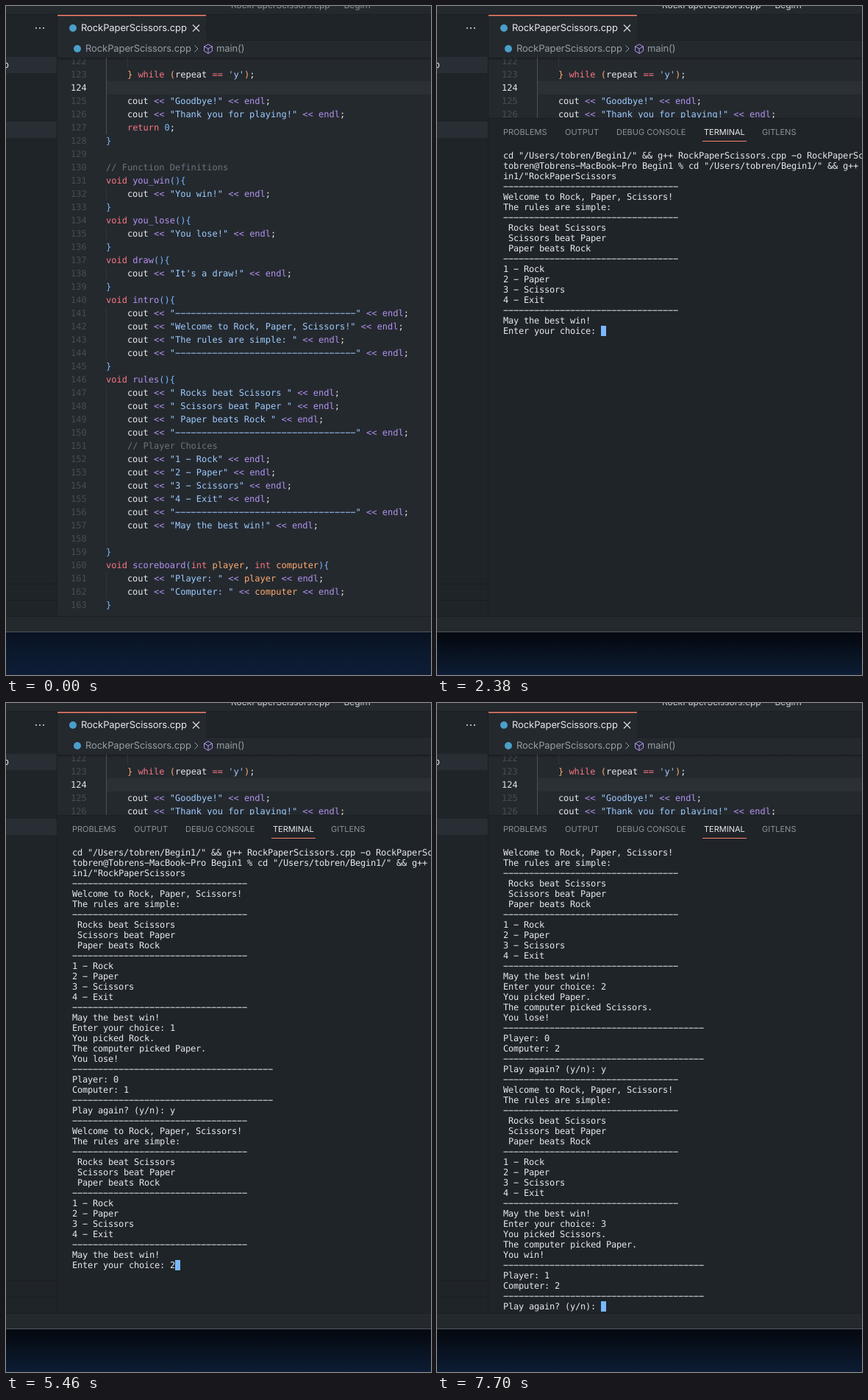
Write an HTML page that moves like this. It is 578 px wide and 908 px high and loops after 8 s.

```html
<!DOCTYPE html>
<html lang="en">
<head>
<meta charset="utf-8">
<title>Rock Paper Scissors</title>
<style>
html, body { margin: 0; width: 100%; height: 100%; overflow: hidden; background: #24292e; }
body { position: relative; text-rendering: geometricPrecision; font-family: Inter, sans-serif; }
div, pre, svg, .label { position: absolute; margin: 0; }
pre { font: 12px/18px "DejaVu Sans Mono", monospace; color: #e6eaee; }
.label { line-height: 20px; white-space: pre; }
#desk { left: 0; top: 850px; width: 100%; height: 58px; background: linear-gradient(#091120, #0b192d 45%, #0d1d35); }
#shade { inset: 0; background: linear-gradient(#04070cd0, #04070c60 50%, #04070c00); }
#editor { left: 70px; top: 70px; width: 508px; height: 759px; overflow: hidden; }
#panel { left: 70px; top: 152px; width: 508px; height: 677px; overflow: hidden; background: #1f2428; }
#term { left: 20px; top: 44px; line-height: 14px; letter-spacing: -.224px; }
#block { width: 7px; height: 14px; box-sizing: border-box; border: 1px solid #79b8ff; }
.guide { width: 1px; background: #30363d; }
svg { inset: 0; fill: none; }
</style>
</head>
<body>
<div id="desk"><div id="shade"></div></div>
<div id="editor">
  <div style="left:66px;top:32px;width:442px;height:18px;background:#2b3036"></div>
  <pre id="nums" style="left:18px;top:-4px;color:#444d56"></pre>
  <pre id="code" style="left:66px;top:-4px"></pre>
  <div id="caret" style="left:94px;top:32px;width:2px;height:18px;background:#c8e1ff"></div>
  <div style="left:0;top:0;width:508px;height:4px;background:linear-gradient(#16191ccc,#16191c00)"></div>
</div>
<div id="panel">
  <pre id="term"></pre>
  <div id="block"></div>
</div>
<svg id="art" width="578" height="850"></svg>
<script>
const $ = id => document.getElementById(id);
const rule = '-'.repeat(34), wide = '-'.repeat(39);
const dashes = s => s.replace(/-/g, '\u2212');   // long hyphens

// window frame
const box = (x, y, w, h, c) => `<rect x="${x}" y="${y}" width="${w}" height="${h}" fill="${c}"/>`;
$('art').innerHTML =
  box(0, 12, 69, 817, '#1f2428') + box(69, 12, 1, 817, '#1b1f23') +
  box(272, 12, 306, 35, '#1f2428') + box(272, 46, 306, 1, '#1b1f23') +
  box(0, 11, 578, 1, '#1b1f23') + box(70, 12, 202, 1.5, '#f9826c') +
  box(0, 69, 69, 22, '#282e34') + box(0, 157, 69, 22, '#282e34') +
  box(0, 784, 69, 1, '#1a1e22') + box(0, 806, 69, 1, '#1a1e22') +
  box(0, 828, 578, 1, '#1b1f23') + box(0, 849, 578, 1, '#50565c') +
  [41, 46, 51].map(x => `<circle cx="${x}" cy="30" r="1.1" fill="#d1d5da"/>`).join('') +
  '<circle cx="91" cy="30" r="5" fill="#4a9fca"/><circle cx="97" cy="58" r="5" fill="#4a9fca"/>' +
  '<path d="M254 25.5l9 9m0-9l-9 9" stroke="#e1e4e8" stroke-width="1.2"/>' +
  '<path d="M256.500 53.500l4.500 4.500-4.500 4.500" stroke="#959da5"/>' +
  '<path d="M275 52l5.500 3v6l-5.500 3.500-5.500-3.500v-6zM269.500 55l5.500 3 5.500-3M275 58v6" stroke="#b392f0"/>';

function label(x, y, text, size, color, parent = document.body) {
  const el = document.createElement('span');
  el.className = 'label';
  el.textContent = text;
  el.style.cssText = `left:${x}px;top:${y - 10}px;font-size:${size}px;color:${color}`;
  if (size == 13) el.style.letterSpacing = '-.1px';
  return parent.appendChild(el);
}
const title = label(306, -1.5, 'RockPaperScissors.cpp \u2014 Begin1', 12, '#d1d5da');
label(102, 30, 'RockPaperScissors.cpp', 13, '#e6eaee');
label(108, 58, 'RockPaperScissors.cpp', 13, '#959da5');
label(286, 58, 'main()', 13, '#959da5');
label(-4, 80, 'p', 13, '#e1e4e8');
[[20, 'PROBLEMS'], [104, 'OUTPUT'], [174, 'DEBUG CONSOLE'], [293, 'TERMINAL'], [372, 'GITLENS']].forEach(([x, name]) =>
  label(x, 19, name, 11, name == 'TERMINAL' ? '#e6eaee' : '#8b939b', $('panel')));
$('panel').insertAdjacentHTML('beforeend',
  '<div style="left:291px;top:31px;width:60px;height:1px;background:#f9826c"></div>' +
  '<div style="left:0;top:0;width:508px;height:1px;background:#1b1f23"></div>');

// source code
const out = s => `    cout << "${s}" << endl;`;
const fn = (head, ...body) => [`void ${head}{`, ...body, '}'];
const code = [
  '', "    } while (repeat == 'y');", '',
  out('Goodbye!'), out('Thank you for playing!'), '    return 0;', '}', '',
  '// Function Definitions',
  ...fn('you_win()', out('You win!')),
  ...fn('you_lose()', out('You lose!')),
  ...fn('draw()', out("It's a draw!")),
  ...fn('intro()', out(rule), out('Welcome to Rock, Paper, Scissors!'), out('The rules are simple: '), out(rule)),
  ...fn('rules()', out(' Rocks beat Scissors '), out(' Scissors beat Paper '), out(' Paper beats Rock '), out(rule),
    '    // Player Choices', out('1 - Rock'), out('2 - Paper'), out('3 - Scissors'), out('4 - Exit'),
    out(rule), out('May the best win!'), ''),
  ...fn('scoreboard(int player, int computer)',
    '    cout << "Player: " << player << endl;', '    cout << "Computer: " << computer << endl;')
];
const tokens = [
  [/\/\/.*/, '#6a737d'], [/"[^"]*"|'y'/, '#9ecbff'], [/\b(?:void|int|while|return)\b|==/, '#f97583'],
  [/<<|endl|\w+(?=\()/, '#b392f0'], [/\b(?:player|computer)\b/, '#ffab70'], [/[{}()]|\b0\b/, '#79b8ff']
];
const lexer = new RegExp(tokens.map(t => `(${t[0].source})`).join('|'), 'g');
const paint = (line, i) => dashes(line.replace(lexer, (m, ...groups) => {
  const k = groups.slice(0, tokens.length).findIndex(g => g !== undefined);
  const color = i == 1 && k == 5 ? '#ffab70' : tokens[k][1];
  return `<span style="color:${color}">${m.replace(/</g, '&lt;')}</span>`;
}));
$('code').innerHTML = code.map(paint).join('\n');
$('nums').innerHTML = code.map((_, i) => i == 2 ? '<span style="color:#e1e4e8">124</span>' : 122 + i).join('\n');

const guide = (x, row, rows, color = '') => $('editor').insertAdjacentHTML('beforeend',
  `<div class="guide" style="left:${x}px;top:${row * 18 - 4}px;height:${rows * 18}px;background:${color}"></div>`);
guide(66, 0, 6, '#4a525a');
guide(95, 0, 1);
[[10, 1], [13, 1], [16, 1], [19, 4], [25, 12], [39, 2]].forEach(([row, rows]) => guide(66, row, rows));

// terminal session: [time, printed text]
const cmd = 'cd "/Users/tobren/Begin1/" && g++ RockPaperScissors.cpp -o RockPaperScissors';
const menu = '\n' + [rule, 'Welcome to Rock, Paper, Scissors!', 'The rules are simple: ', rule,
  ' Rocks beat Scissors', ' Scissors beat Paper', ' Paper beats Rock', rule,
  '1 - Rock', '2 - Paper', '3 - Scissors', '4 - Exit', rule,
  'May the best win!', 'Enter your choice: '].join('\n');
const result = (you, cpu, end, a, b) => '\n' + [`You picked ${you}.`, `The computer picked ${cpu}.`, `You ${end}!`,
  wide, `Player: ${a}`, `Computer: ${b}`, wide, 'Play again? (y/n): '].join('\n');
const session = [
  [1050, cmd],
  [1120, `\ntobren@Tobrens-MacBook-Pro Begin1 % ${cmd}\nin1/"RockPaperScissors`],
  [1540, menu], [3290, '1'], [3570, result('Rock', 'Paper', 'lose', 0, 1)],
  [4900, 'y'], [5040, menu], [5460, '2'], [5740, result('Paper', 'Scissors', 'lose', 0, 2)],
  [6790, 'y'], [6930, menu], [7490, '3'], [7700, result('Scissors', 'Paper', 'win', 1, 2)]
];

const show = (el, on) => el.style.visibility = on ? 'visible' : 'hidden';
const start = performance.now();
let shown;
function draw() {
  const t = (performance.now() - start) % 8000;
  const active = t >= 700;
  title.style.opacity = active ? 1 : .6;
  show($('shade'), active);
  show($('caret'), active && t < 1400 || t >= 1960 && t < 2380);
  show($('panel'), t >= 910);

  const text = session.filter(e => e[0] <= t).map(e => e[1]).join('');
  if (text !== shown) {
    shown = text;
    const lines = text.split('\n').slice(-45), last = lines.length - 1;
    $('term').textContent = dashes(lines.join('\n'));
    $('block').style.left = 20 + 7 * lines[last].length + 'px';
    $('block').style.top = 44 + 14 * last + 'px';
  }
  $('block').style.display = t >= 1540 ? '' : 'none';
  $('block').style.background = t >= 2380 ? '#79b8ff' : 'none';
  requestAnimationFrame(draw);
}
draw();
</script>
</body>
</html>
```
